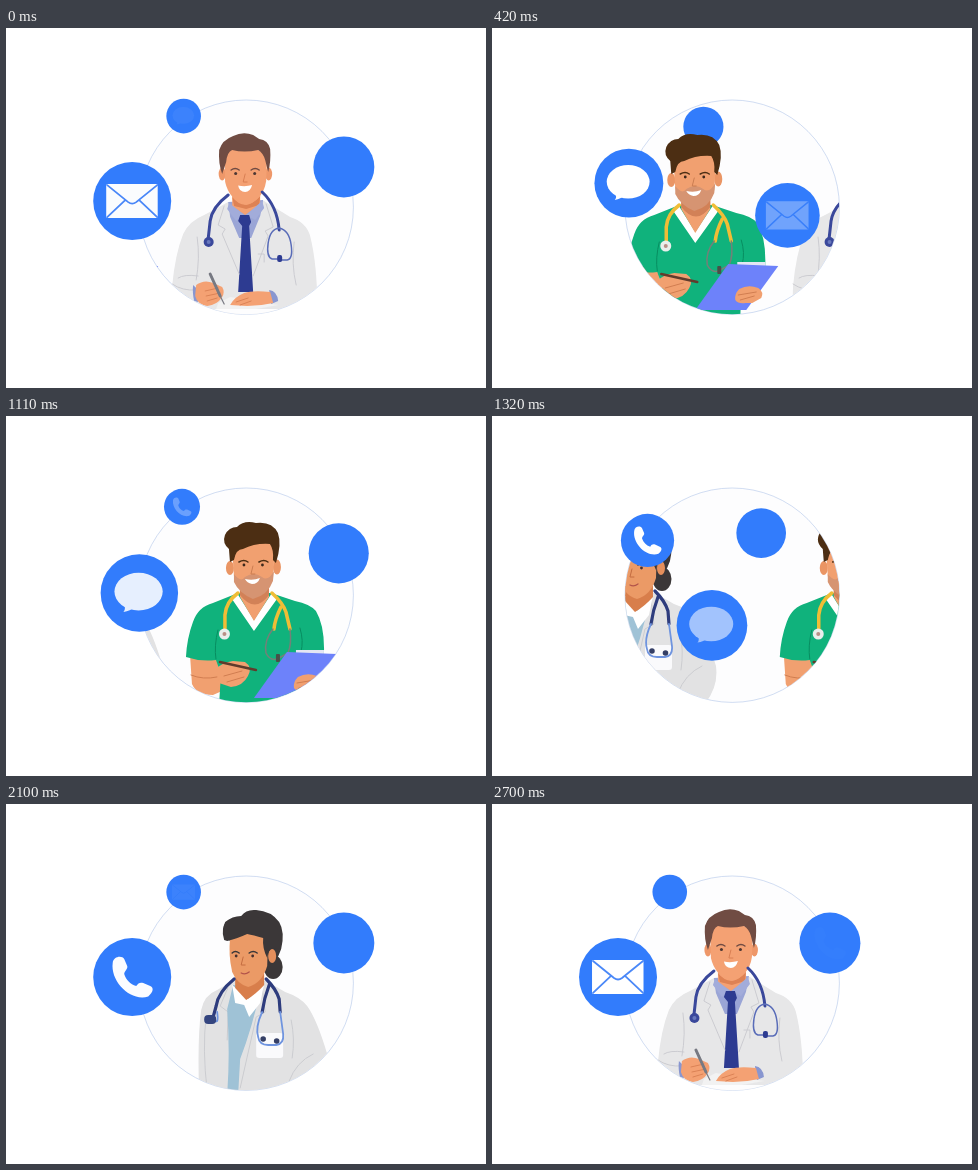
Recreate the animation shown at these times as an HTML page. Size 480x360 px, loop 3150 ms.

```html
<!DOCTYPE html>
<html lang="en">
<head>
<meta charset="utf-8">
<title>Doctors</title>
<style>
  html, body { margin: 0; width: 100%; height: 100%; overflow: hidden; background: #fff; }
  svg { display: block; width: 100%; height: 100%; }
  .l { fill: none; stroke-linecap: round; stroke-linejoin: round; }
</style>
</head>
<body>
<svg viewBox="0 0 480 360">
  <defs>
    <clipPath id="disc"><circle cx="240.2" cy="179.2" r="107"/></clipPath>

    <g id="mail">
      <rect x="-26" y="-17" width="51.5" height="34" rx="1.5" fill="#fff"/>
      <g class="l" stroke="#4a88f8" stroke-width="1.8">
        <path d="M-25-16L-4 1Q0 4 4 1L25-16M-25 16L-7-1M25 16L7-1"/>
      </g>
    </g>
    <g id="chat" fill="#fff">
      <ellipse cx="-.8" cy="-1.5" rx="24.3" ry="19"/>
      <path d="M-16 10Q-13 16-16 19Q-9 18-5 14Z"/>
    </g>
    <g id="phone">
      <path fill="#fff" d="M-19.500-14C-19-21-10-22-8-18L-5-11C-4-8-8-6-8-3C-6 3-2 7 4 9C6 6 8 5 11 6L18 9C22 11 21 15 16 19.500C-2 25-22 4-19.500-14Z"/>
    </g>
  </defs>

  <circle cx="240.2" cy="179.2" r="107.2" fill="#fdfdfe" stroke="#b3c6ea" stroke-width=".6"/>
  <g id="cb"><circle r="39" fill="#327cfc"/></g>

  <g clip-path="url(#disc)">
    <!-- man in a white coat -->
    <g class="who">
      <path fill="#e7e7e8" d="M222 174L198 187Q183 193 177 206Q169 226 166 258L165 290L311 290Q312 240 304 208Q300 194 284 189L258 173Z"/>
      <path fill="#fdfdfe" d="M160 281H315V290H160Z"/>
      <path fill="#f2f2f2" d="M212 275L224 269L272 277L250 281H210Z"/>
      <path fill="#9aa5d6" d="M222 174L257 172L254 188L245 210H233L224 189Z"/>
      <path fill="#f4a173" d="M226 165H254V176L239 187L226 178Z"/>
      <path fill="#de8254" d="M226 169Q239 185 254 168L253 177L240 181L228 178Z"/>
      <path fill="#a2acda" d="M223 175L238 187L230 193L221 181ZM256 173L240 187L249 192L258 180Z"/>
      <path fill="#2d3b91" d="M234 187H243L245 194L243 198L247 264H232L236 198L232 193Z"/>
      <path class="l" stroke="#c9c9ce" stroke-width=".9" d="M218 178L212 197L219 201L216 206L233 246M260 176L267 199L259 203L262 208L247 248M191 209Q194 230 190 252M288 214Q285 236 290 257M192 248Q178 246 172 250M252 226H258V234M166 256Q176 263 190 262"/>
      <ellipse cx="216" cy="146" rx="3.5" ry="6.5" fill="#ee9769"/>
      <ellipse cx="262.500" cy="146" rx="3.5" ry="6.5" fill="#ee9769"/>
      <path fill="#f4a173" d="M218 125Q238 111 261 127L260 153Q257 172 240 177Q223 172 219 154Z"/>
      <path fill="#704c43" d="M216 146Q212 135 213 122Q216 112 227 108Q237 103 247 107Q250 109 253 111Q262 112 264 121Q265 134 262 144L259 132Q257 125 252 122Q238 125 226 122Q221 124 220 134Z"/>
      <path class="l" stroke="#704c43" stroke-width="1.500" d="M225 142Q229 139 233 142M245 142Q249 139 253 142"/>
      <circle cx="229.500" cy="145.500" r="1.500" fill="#4c3733"/><circle cx="248.500" cy="145.500" r="1.500" fill="#4c3733"/>
      <path class="l" stroke="#d97f53" stroke-width="1" d="M239 146L237 154H241"/>
      <path fill="#fff" d="M232 157.500Q239 159 246 157Q244 164 239 164Q233 164 232 157.500Z"/>
      <g class="l" stroke="#3a489b">
        <path stroke-width="3" d="M222 167Q206 179 204 193L202 211M256 164Q271 178 273 202"/>
        <path stroke-width="1.500" stroke="#596cb8" d="M273 200Q264 201 262 215Q260 229 266 231H271M273 200Q283 202 285 217Q287 231 281 232H276"/>
      </g>
      <circle cx="202.500" cy="214" r="5" fill="#3a489b"/><circle cx="202.500" cy="214" r="2" fill="#6878bd"/>
      <rect x="271" y="227" width="5" height="7" rx="2" fill="#2d3b91"/>
      <path fill="#8896d0" d="M187 257Q193 261 192 274L188 273Q186 264 187 257ZM263 262Q271 263 272 273L265 276Z"/>
      <path fill="#f4a173" d="M190 257Q198 251 207 255L216 259Q219 264 216 269Q211 277 201 278Q191 276 189 268Z"/>
      <path fill="#f4a173" d="M224 277Q228 269 238 265Q247 262 264 264L267 275Q254 278 241 278Z"/>
      <path class="l" stroke="#d97f53" stroke-width=".9" d="M199 263L212 260M200 268L214 265M201 273L211 270M230 274L242 270M234 277L245 273"/>
      <path class="l" stroke="#777982" stroke-width="3" d="M204 246L214 268"/>
      <path class="l" stroke="#777982" stroke-width="1.200" d="M214 268L218 276"/>
    </g>

    <!-- man in green scrubs -->
    <g class="who">
      <path fill="#f1a070" d="M175 238L202 238L204 256L226 246Q236 250 232 261Q226 270 214 272L198 279Q182 279 177 268Z"/>
      <path fill="#10b27c" d="M223 177L198 187Q183 191 178 206Q172 222 171 241Q186 246 201 244L206 258L204 290H284L286 238H309Q310 210 301 195Q295 188 280 185L256 177Z"/>
      <path class="l" stroke="#078d60" stroke-width="1" d="M203 214Q199 230 201 243M285 212Q289 225 286 236"/>
      <path fill="#fff" d="M222 177L239 204L257 177L262 183L239 215L217 183Z"/>
      <path fill="#f1a070" d="M225 165H254V181L239 205L225 181Z"/>
      <path fill="#d28157" d="M225 169Q240 190 254 168V179Q240 198 225 179Z"/>
      <ellipse cx="215" cy="152" rx="4" ry="7" fill="#ea9564"/>
      <ellipse cx="262" cy="151" rx="4" ry="7.500" fill="#ea9564"/>
      <path fill="#f1a070" d="M217 130Q239 114 260 129L258 162Q254 177 238 182Q222 175 219 160Z"/>
      <path fill="#d69472" d="M219 158Q226 167 230 161Q239 155 247 161Q253 166 259 155L258 165Q253 179 238 183Q224 177 219 166Z"/>
      <path fill="#4c2e13" d="M215 146L214 133Q207 127 210 119Q214 111 222 111Q229 104 241 107Q257 105 263 117Q267 128 261 147L258 144Q259 134 255 128Q240 127 228 133Q221 133 219 144Z"/>
      <path class="l" stroke="#4c2e13" stroke-width="1.500" d="M224 146Q229 143 233 146M244 146Q249 143 253 146"/>
      <circle cx="229" cy="149" r="1.400" fill="#3c281c"/><circle cx="247.500" cy="149" r="1.400" fill="#3c281c"/>
      <path class="l" stroke="#cb7d51" stroke-width="1" d="M238 150L236 158H240"/>
      <path fill="#fff" d="M230 163Q238 165 245 162Q243 168 237 168Q232 167 230 163Z"/>
      <g class="l">
        <path stroke="#f0bd36" stroke-width="3.500" d="M223 177Q211 186 210 199V213M257 177Q268 187 271 196L275 213M266 191Q260 203 259 213"/>
        <path stroke="#748078" stroke-width="1.500" d="M258 213Q249 224 251 237Q255 245 262 243M275 213Q277 228 273 237L264 242"/>
      </g>
      <circle cx="209.500" cy="218" r="5.500" fill="#e9eeec"/><circle cx="209.500" cy="218" r="2" fill="#b88f86"/>
      <rect x="261" y="238" width="4" height="8" rx="1" fill="#485048"/>
      <path fill="#e4e6f3" d="M281 234H309V239H281Z"/>
      <path fill="#6d82fa" d="M272 236L322 238L290 282H239Z"/>
      <path fill="#f1a070" d="M279 272Q278 266 283 261Q292 256 302 260Q308 264 305 270L296 275L289 275Q282 276 279 272Z"/>
      <path fill="#f1a070" d="M201 253Q208 246 218 245L230 246Q238 251 233 260Q228 270 216 271L204 267Z"/>
      <path class="l" stroke="#cd7a4d" stroke-width=".9" d="M176 259Q188 264 202 261M209 260L227 255M212 266L229 261M282 267L300 264M284 272L298 268"/>
      <path class="l" stroke="#603c2c" stroke-width="2.500" d="M205 246L241 254"/>
    </g>

    <!-- woman in a white coat -->
    <g class="who">
      <path fill="#e2e2e3" d="M228 176L211 186Q198 191 195 206Q191 235 193 290H308Q324 272 321 250Q311 216 301 202Q294 193 279 188L260 177Z"/>
      <path class="l" stroke="#c9cacf" stroke-width=".9" d="M200 212Q196 245 201 287M285 216Q289 235 286 254M222 183L214 202L222 208L221 236M256 184L259 208L250 213L234 284M283 277Q290 258 307 250"/>
      <path fill="#9fc2d6" d="M227 181L255 183Q246 224 234 255L232 290H221Q224 250 221 205Z"/>
      <path fill="#fff" d="M226 181L242 195L258 180L254 199L243 213L238 201L229 199Z"/>
      <path fill="#d87e4b" d="M229 170H258V181Q250 190 240 196L229 184Z"/>
      <ellipse cx="267" cy="163" rx="9.5" ry="12" fill="#3b3738"/>
      <path fill="#3b3738" d="M219 135Q215 126 219 118Q226 112 235 112Q240 105 250 106Q265 107 273 118Q279 128 275 145Q270 160 262 161L240 142Z"/>
      <path fill="#eb9a66" d="M224 133Q242 119 262 132L261 162Q256 179 242 183Q231 180 226 168Q222 151 224 133Z"/>
      <ellipse cx="266" cy="152" rx="4" ry="7" fill="#e58f5c"/>
      <path fill="#3b3738" d="M218 136Q214 124 221 117Q234 111 244 113Q261 111 272 126V145L267 144Q262 145 261 154Q256 144 257 134Q247 131 241 130Q230 135 221 137Z"/>
      <path class="l" stroke="#3b3738" stroke-width="1.500" d="M226 149Q229 146 233 149M243 149Q247 146 251 149"/>
      <circle cx="230" cy="152" r="1.400" fill="#453130"/><circle cx="246.500" cy="152" r="1.400" fill="#453130"/>
      <path class="l" stroke="#c46c40" stroke-width="1" d="M237 153L235 161H239"/>
      <path class="l" stroke="#b3544a" stroke-width="1.300" d="M235 169Q239 171 243 168"/>
      <rect x="250" y="229" width="27" height="25" rx="3" fill="#fafafc"/>
      <g class="l" stroke="#2e3c7d">
        <path stroke-width="3.200" d="M228 175Q212 188 210 202L207 213M260 175Q270 185 273 195L274 208M263 181Q258 194 256 208"/>
        <path stroke="#6f94df" stroke-width="1.800" d="M256 208Q249 223 252 233Q253 241 262 241H270Q278 240 277 230L274 208M207 214Q213 223 211 208"/>
      </g>
      <rect x="198" y="211" width="12" height="9" rx="4" fill="#34457f"/>
      <circle cx="257" cy="235" r="2.800" fill="#353f66"/><circle cx="270.500" cy="237" r="2.800" fill="#353f66"/>
    </g>
  </g>

  <g id="ac"><circle r="39" fill="#327cfc"/><use/></g>
  <g id="ba"><circle r="39" fill="#327cfc"/><use/></g>
</svg>
<script>
const STEP = 1050, MOVE = 620, LEAD = 11;
const A = [126, 173, 39], B = [177.7, 88, 17.3], C = [338, 139, 30.5];
const ICONS = ['mail', 'chat', 'phone'];
const ENTER = 170, EXIT = [171, 272, 179];

const el = id => document.getElementById(id);
const people = document.querySelectorAll('.who');
const cb = el('cb'), ac = el('ac'), ba = el('ba');
const mix = (from, to, p) => from.map((v, i) => v + (to[i] - v) * p);

function place(node, [x, y, r]) {
  node.setAttribute('transform', `translate(${x} ${y}) scale(${r / 39})`);
}

function setIcon(node, name, alpha) {
  const use = node.lastElementChild;
  use.setAttribute('href', '#' + name);
  use.setAttribute('opacity', alpha);
}

function draw(now) {
  const t = (now + LEAD) % (STEP * 3);
  const out = Math.floor(t / STEP), next = (out + 1) % 3;
  const q = Math.min(1, (t % STEP) / MOVE);
  const p = (1 - Math.cos(Math.PI * q)) / 2;

  people.forEach((node, i) => {
    const x = i === out ? EXIT[i] * p : ENTER * (p - 1);
    const shown = i === out ? p < 1 : i === next && p > 0;
    node.setAttribute('transform', `translate(${x} 0)`);
    node.setAttribute('visibility', shown ? 'visible' : 'hidden');
  });

  // the large circle swings below the straight line
  const low = mix(A, C, p), bow = 4 * p * (1 - p);
  low[0] += 3 * bow;
  low[1] += (40 + 28 * p) * bow;
  place(ac, low);
  place(ba, mix(B, A, p));
  place(cb, mix(C, B, p));
  setIcon(ac, ICONS[out], 1 - q);
  setIcon(ba, ICONS[next], Math.min(1, q * 2.4));
}

function tick() {
  draw(performance.now());
  requestAnimationFrame(tick);
}
tick();
</script>
</body>
</html>
```
